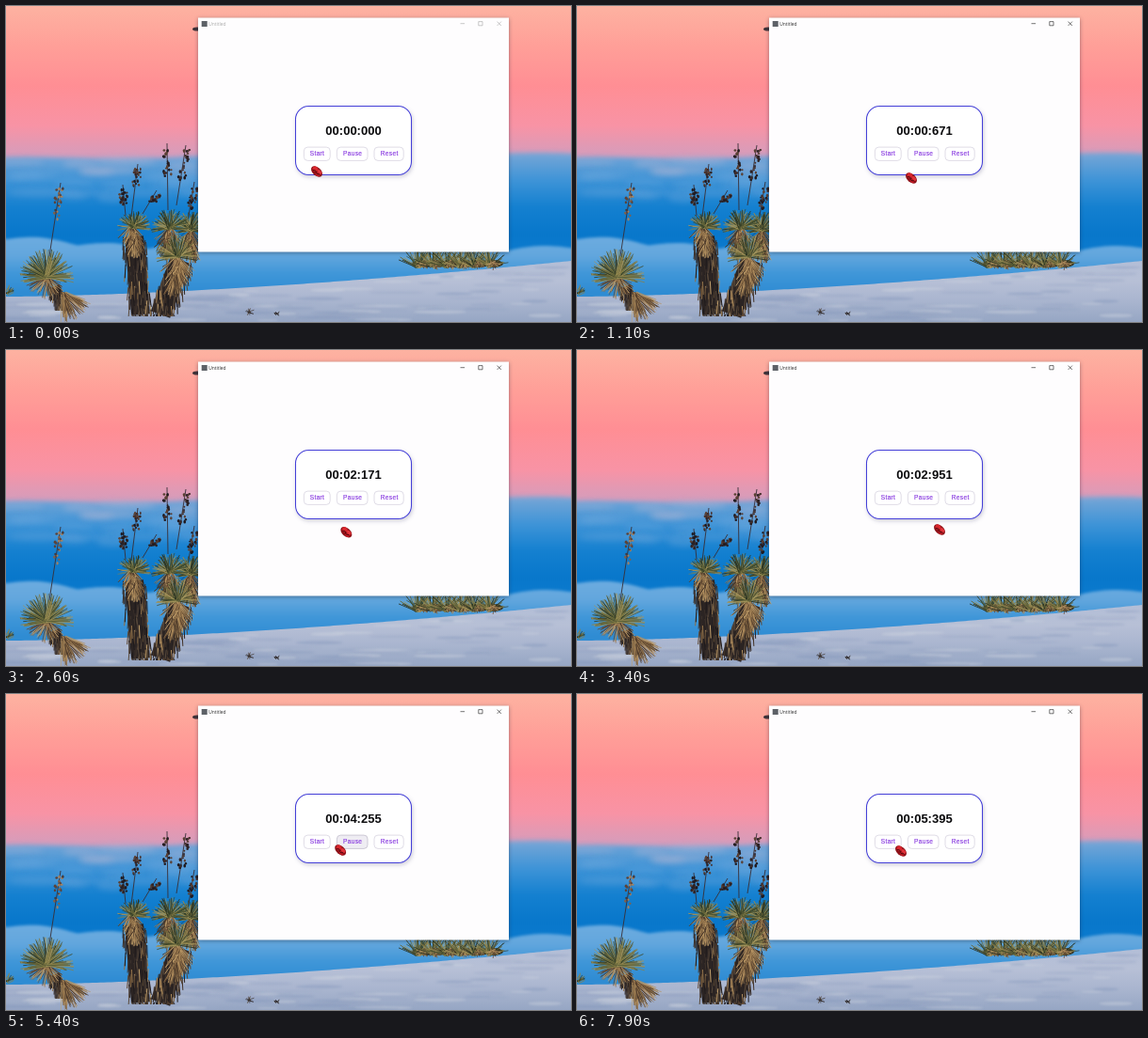
An HTML page with a canvas for the animation above (8 s loop, 600 px wide and 336 px high).

```html
<!DOCTYPE html>
<html lang="en">
<head>
<meta charset="utf-8">
<title>Stopwatch</title>
<style>
  html, body { margin: 0; width: 600px; height: 336px; overflow: hidden; }
  canvas, svg { position: absolute; left: 0; top: 0; display: block; }
  text { font-family: "Liberation Sans", Arial, sans-serif; }
  #title { font: 4.9px "Open Sans", sans-serif; }
  #time { font-size: 13px; font-weight: bold; text-anchor: middle; }
  .label { font-size: 6.6px; letter-spacing: .3px; fill: #8433df; stroke: #8433df; stroke-width: .14px; }
  .button { fill: #fff; stroke: #dcd9e4; stroke-width: .9; }
  .button.hover { fill: #efedf3; stroke: #c9c6d2; }
  .window { filter: drop-shadow(0 1px 2px rgba(10, 20, 40, .4)); }
  .card { filter: drop-shadow(1px 2px 2px rgba(40, 40, 90, .22)); }
</style>
</head>
<body>
<canvas id="scene" width="600" height="336"></canvas>
<svg width="600" height="336" viewBox="0 0 600 336">
  <rect class="window" x="204" y="12.5" width="330" height="249" fill="#fefdfe"/>
  <rect x="207.7" y="16" width="6" height="6" fill="#5d6167"/>
  <g id="chrome">
    <text id="title" x="215.3" y="21">Untitled</text>
    <path d="M482.5 18.7h4.6M501.8 16.6h4.2v4.2h-4.2zM521.6 16.6l4.3 4.3M525.9 16.6l-4.3 4.3" fill="none" stroke="currentColor" stroke-width=".65"/>
  </g>
  <rect class="card" x="307.5" y="106.5" width="123" height="73" rx="14" fill="#fff" stroke="#4540d8" stroke-width="1.05"/>
  <text id="time" x="369" y="137.4" fill="#0a0a0c">00:00:000</text>
  <rect class="button" x="316.4" y="150.1" width="27.8" height="14.3" rx="4"/>
  <rect class="button" x="351.4" y="150.1" width="32.6" height="14.3" rx="4"/>
  <rect class="button" x="391" y="150.1" width="31.2" height="14.3" rx="4"/>
  <text class="label" x="322.8" y="159.4">Start</text>
  <text class="label" x="358" y="159.4">Pause</text>
  <text class="label" x="397.8" y="159.4">Reset</text>
  <g id="cursor">
    <g transform="rotate(42)">
      <ellipse rx="7" ry="4.4" fill="#8d1118"/>
      <ellipse cx="-3" cy="-1" rx="3" ry="2.6" fill="#d8262d"/>
      <ellipse cx="2.5" cy="-1.6" rx="2.8" ry="1.8" fill="#e0333a"/>
      <ellipse cx="2.6" cy="1.8" rx="2.8" ry="1.5" fill="#bf1b24"/>
      <path d="M-4 1.4Q-1-1 0 1t4-.8" fill="none" stroke="#4a080d" stroke-width=".9"/>
    </g>
  </g>
</svg>
<script>
const $ = id => document.getElementById(id);
const ctx = $('scene').getContext('2d');
const W = 600, H = 336, TAU = Math.PI * 2;

let seed = 11;
const rand = () => (seed = (seed * 16807) % 2147483647) / 2147483647;
const spread = r => (rand() * 2 - 1) * r;
const mix = (a, b, k) => a + (b - a) * k;
const pick = list => list[Math.floor(rand() * list.length)];

function gradient(y0, y1, ...colors) {
  const g = ctx.createLinearGradient(0, y0, 0, y1);
  colors.forEach((c, i) => g.addColorStop(i / (colors.length - 1), c));
  return g;
}

function line(x0, y0, x1, y1, color, width) {
  ctx.beginPath();
  ctx.moveTo(x0, y0);
  ctx.lineTo(x1, y1);
  ctx.strokeStyle = color;
  ctx.lineWidth = width;
  ctx.stroke();
}

function blob(x, y, rx, ry, fill) {
  ctx.beginPath();
  ctx.ellipse(x, y, rx, ry, 0, 0, TAU);
  ctx.fillStyle = fill;
  ctx.fill();
}

// Area between two curves of x
function band(top, bottom, fill, blur = 0) {
  ctx.save();
  if (blur) ctx.filter = `blur(${blur}px)`;
  ctx.beginPath();
  for (let x = -20; x <= W + 20; x += 4) ctx.lineTo(x, top(x));
  for (let x = W + 20; x >= -20; x -= 4) ctx.lineTo(x, bottom(x));
  ctx.fillStyle = fill;
  ctx.fill();
  ctx.restore();
}

const GREEN = ['#3f4a2c', '#6a6a3c', '#8a8048', '#2a3322', '#a4955c'];
const STRAW = ['#8f7049', '#b08d5e', '#5f4630', '#c2a06c', '#423226'];
const BARK = ['#2c2422', '#3d322c', '#594a3c', '#1e1a1c'];
const POD = ['#2c2225', '#46302b', '#1f1a20', '#5a4034'];

// Fan of leaves around an angle in degrees; -90 points up
function tuft(x, y, r, mid, half, n, colors) {
  for (let i = 0; i < n; i++) {
    const a = (mid + spread(half)) * TAU / 360;
    const len = r * mix(.6, 1, rand());
    line(x + spread(3), y + spread(2), x + Math.cos(a) * len, y + Math.sin(a) * len, pick(colors), mix(.5, .95, rand()));
  }
}

function trunk(x0, y0, x1, y1, w) {
  line(x0, y0, x1, y1, '#2b2423', w * .8);
  for (let i = 0; i < w * 5; i++) {
    const k = rand(), x = mix(x0, x1, k) + spread(w / 2);
    line(x, mix(y0, y1, k), x + spread(2), Math.min(mix(y0, y1, k) + 14, y1 + 2), pick(i % 4 ? BARK : STRAW), 1);
  }
}

// Flower stalk with seed pods thinning out downwards
function stalk(x0, y0, x1, y1, pods, colors = POD) {
  line(x0, y0, x1, y1, '#382f37', .9);
  for (let i = 0; i < 24; i++) {
    const k = rand() * pods;
    blob(mix(x1, x0, k) + spread(4.2), mix(y1, y0, k) + 5, mix(.8, 1.6, rand()), mix(.9, 2, rand()), pick(colors));
  }
}

function head(x, y, r) {
  for (let i = 0; i < 4; i++) tuft(x + spread(3), y + i * r / 4, r, 90, 55 - i * 8, 40, STRAW);
  tuft(x, y, r * .95, -90, 105, 95, GREEN);
}

function sky() {
  ctx.fillStyle = gradient(0, 170, '#fdb2a1', '#ff9f98', '#ff8e94', '#f893a5', '#c9a0c3');
  ctx.fillRect(0, 0, W, H);
  const edge = x => 159 - 3 * Math.cos(x / 45) + (x < 150 ? 5 * (1 - x / 150) : 0);
  const floor = () => H;
  band(edge, floor, gradient(156, 300, '#78a6d6', '#3f94d7', '#1480d0', '#0877cb', '#0d7ccf', '#2488d2'), 2.5);
  for (let i = 0; i < 26; i++) {
    const x = rand() * 205, y = mix(164, 207, rand());
    ctx.filter = 'blur(3px)';
    blob(x, y, mix(14, 34, rand()), mix(2, 5, rand()), y < 178 ? '#a1b2d680' : '#66a6dc66');
  }
  ctx.filter = 'none';
  const puffs = x => 253 - 5 * Math.abs(Math.sin(x / 24)) + 9 * Math.sin(x / 95 - .6) * Math.cos(x / 190);
  band(puffs, floor, gradient(246, 304, '#6cabdf', '#62a6dd', '#3f96d8', '#2f8cd3'), 1.6);
}

const ridge = x => 309 - 38 * Math.max(0, x / W) ** 1.6;

function ground() {
  band(ridge, () => H, gradient(270, H, '#b3bed7', '#b7c0d6', '#a9b5cf', '#96a6c4'));
  ctx.filter = 'blur(1px)';
  for (let i = 0; i < 90; i++) {
    const x = rand() * W, y = mix(ridge(x) + 4, H, rand());
    blob(x, y, mix(8, 34, rand()), mix(.6, 2, rand()), pick(['#7f94ba66', '#d3d7e166', '#94a4c366']));
  }
  ctx.filter = 'none';
}

function plants() {
  tuft(0, 306, 10, -50, 40, 14, GREEN);
  stalk(46, 266, 58, 188, .45, ['#80604b', '#5b4339', '#a28162', '#463a3a']);
  trunk(52, 298, 63, 322, 12);
  tuft(61, 306, 31, 55, 40, 100, STRAW);
  tuft(43, 289, 23, 90, 70, 60, STRAW);
  tuft(43, 288, 30, -90, 105, 160, GREEN);

  stalk(127, 223, 124, 190, .5);
  stalk(133, 224, 140, 168, .35);
  stalk(145, 221, 160, 196, .3);
  stalk(172, 217, 171, 146, .5);
  stalk(181, 212, 191, 148, .5);
  stalk(192, 235, 200, 187, .5);
  trunk(136, 245, 143, 328, 25);
  trunk(185, 270, 164, 328, 27);
  head(196, 238, 21);
  head(174, 236, 22);
  head(136, 235, 19);
  head(182, 266, 25);

  for (let x = 438; x < 520; x += 15) {
    blob(x + 4, 274, 11, 4, '#3a3524');
    tuft(x, 277, 23, -90, 80, 45, GREEN);
    tuft(x + 4, 272, 9, 90, 75, 22, STRAW);
  }
  tuft(259, 327, 6, -80, 95, 8, BARK);
  tuft(288, 328, 4, -90, 90, 6, BARK);
  blob(203, 24.5, 5, 2, '#40343a');
}

sky();
ground();
plants();

// [ms, cursor x, cursor y, stopwatch reading]
const keys = [
  [0, 330, 176, 0], [430, 331, 166, 0], [1100, 355, 183, 671], [1900, 342, 196, 1489],
  [3400, 385, 191, 2951], [4400, 370, 168, 3956], [4700, 370, 167, 4255], [6110, 340, 165, 4255],
  [6400, 344, 180, 4545], [7250, 371, 168, 5395], [7900, 344, 167, 5395]
];
const LOOP = 8000, STEP = 100, HOVER_LAG = 200;
const smooth = k => k * k * (3 - 2 * k);
const pad = (n, len) => String(n).padStart(len, '0');

function pose(t) {
  const i = Math.max(1, keys.findLastIndex(k => k[0] <= t) + 1);
  const a = keys[i - 1], b = keys[i] || a;
  const k = b === a ? 0 : Math.max(0, (t - a[0]) / (b[0] - a[0]));
  return { x: mix(a[1], b[1], smooth(k)), y: mix(a[2], b[2], smooth(k)), ms: Math.round(mix(a[3], b[3], k)) };
}

function render(now) {
  const t = Math.floor(now % LOOP / STEP) * STEP;
  const { x, y, ms } = pose(t);
  $('time').textContent = `00:${pad(Math.floor(ms / 1000), 2)}:${pad(ms % 1000, 3)}`;
  $('cursor').setAttribute('transform', `translate(${x} ${y})`);

  // Buttons react a little after the pointer's tip reaches them
  const past = pose(t - HOVER_LAG), tipX = past.x - 5, tipY = past.y - 6;
  for (const el of document.querySelectorAll('.button')) {
    const left = el.x.baseVal.value, right = left + el.width.baseVal.value;
    el.classList.toggle('hover', tipX > left && tipX < right && tipY > 150 && tipY < 165);
  }

  const ink = t < keys[1][0] ? '#aaa' : '#2a2a2a';
  $('chrome').setAttribute('fill', ink);
  $('chrome').setAttribute('color', ink);
}

const origin = performance.now();
function loop() {
  render(performance.now() - origin);
  requestAnimationFrame(loop);
}
loop();
</script>
</body>
</html>
```
